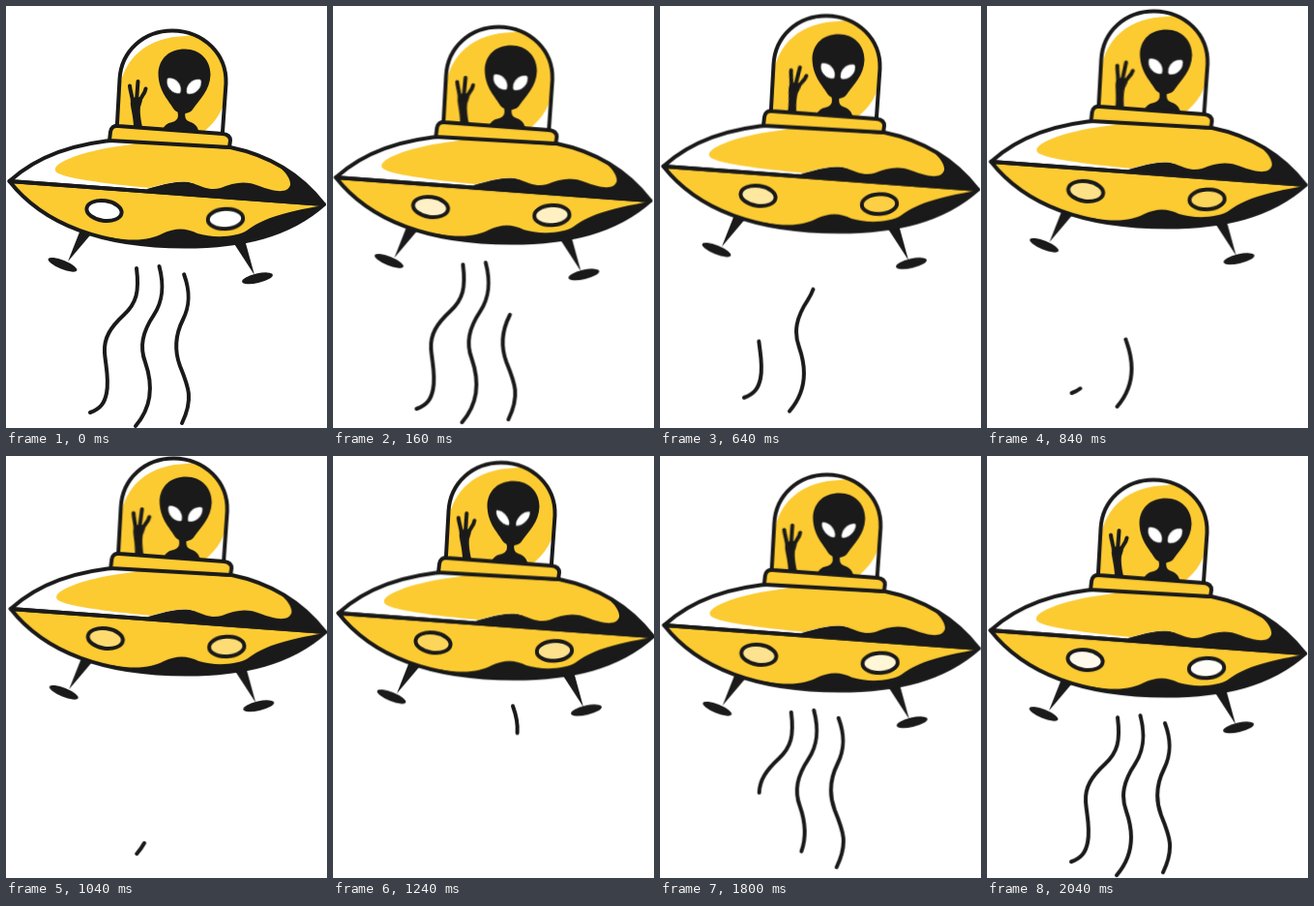
An HTML page for the animation above (2080 ms loop, 332 px wide and 436 px high).

```html
<!DOCTYPE html>
<html lang="en">
<head>
<meta charset="utf-8">
<title>Flying saucer</title>
<style>
  html, body { margin: 0; width: 100%; height: 100%; overflow: hidden; background: #fff; }
  svg { display: block; width: 332px; height: 436px; }

  .ink { fill: #1a1a1a; }
  .gold { fill: #fccb32; }
  .white { fill: #fff; }
  .line { fill: none; stroke: #1a1a1a; stroke-width: 4; stroke-linejoin: round; stroke-linecap: round; }

  .rise, .sway, .arm, .eye, .glow, .beam { animation: 2080ms linear infinite; }
  .rise { animation-name: rise; }
  .sway { animation-name: sway; }
  .arm { animation-name: wave; animation-timing-function: ease-in-out; transform-origin: 136px 126px; }
  .eye { animation-name: squint; }
  .glow.left { animation-name: glow-left; }
  .glow.right { animation-name: glow-right; }
  .beam { stroke-dasharray: 1 3; }
  .beam.a { animation-name: beam-a; }
  .beam.b { animation-name: beam-b; }
  .beam.c { animation-name: beam-c; }

  @keyframes rise {
    0%, 100% { transform: translateY(0); }
    48.1% { transform: translateY(-24px); }
  }
  @keyframes sway {
    0%, 100% { transform: translateX(0); }
    15.4% { transform: translateX(-1.2px); }
    59.6% { transform: translateX(2px); }
  }
  @keyframes wave {
    0%, 100% { transform: rotate(0deg); }
    30% { transform: rotate(10deg); }
    66% { transform: rotate(-1deg); }
  }
  @keyframes squint {
    0%, 48%, 97%, 100% { transform: scaleY(1); }
    69% { transform: scaleY(.55); }
  }
  @keyframes glow-left {
    0%, 100% { opacity: 1; }
    7.7% { opacity: .73; }
    23.1% { opacity: .62; }
    40.4% { opacity: .42; }
    59.6% { opacity: .2; }
    75% { opacity: 0; }
    98.1% { opacity: .9; }
  }
  @keyframes glow-right {
    0%, 100% { opacity: 1; }
    7.7% { opacity: .7; }
    23.1% { opacity: 0; }
    40.4% { opacity: .2; }
    59.6% { opacity: .45; }
    75% { opacity: .65; }
    98.1% { opacity: .96; }
  }
  /* Each beam is wiped away from the top, then drawn again from the top. */
  @keyframes beam-a {
    0%, 13.5% { stroke-dashoffset: 0; }
    43% { stroke-dashoffset: -1.03; }
    43.01%, 71.2% { stroke-dashoffset: 1.03; }
    98.1%, 100% { stroke-dashoffset: 0; }
  }
  @keyframes beam-b {
    0%, 24.5% { stroke-dashoffset: 0; }
    53% { stroke-dashoffset: -1.03; }
    53.01%, 63% { stroke-dashoffset: 1.03; }
    90%, 100% { stroke-dashoffset: 0; }
  }
  @keyframes beam-c {
    0% { stroke-dashoffset: 0; }
    27% { stroke-dashoffset: -1.03; }
    27.01%, 53.6% { stroke-dashoffset: 1.03; }
    83.7%, 100% { stroke-dashoffset: 0; }
  }
</style>
</head>
<body>
<svg viewBox="0 0 332 436">
  <defs>
    <path id="dome" d="M114.5 130 L117.5 76 C119 46 143 25.5 172 25.5 C205 26 228.5 50 227.5 80 L223.5 137 Z"/>
    <path id="top" d="M3.5 181 C30 157 68 141 122 138 L232 146 C276 155 308 178 329 205 Z"/>
    <path id="belly" d="M3.5 181 C38 225 98 248.5 185 248.5 C245 248.5 293 237 329 205 Z"/>
    <clipPath id="in-dome"><use href="#dome"/></clipPath>
    <clipPath id="in-top"><use href="#top"/></clipPath>
    <clipPath id="in-belly"><use href="#belly"/></clipPath>
  </defs>

  <g class="rise"><g class="sway">
    <g class="line">
      <path class="beam a" pathLength="1" d="M135 271 C138 295 135 307 122 319 C108 332 101 343 102 358 C103 372 107 385 104 400 C102 410 98 416 87 420"/>
      <path class="beam b" pathLength="1" d="M158.5 269 C164 290 162 305 153 319 C141 337 138 352 144 368 C151 388 153 412 134 434"/>
      <path class="beam c" pathLength="1" d="M184 277 C191 296 190 310 183 324 C175 340 174 356 180 372 C189 394 194 406 182 431"/>
    </g>

    <g class="ink">
      <path d="M79 226 L92 231 L64 264 Z"/>
      <ellipse cx="58.5" cy="267.3" rx="16" ry="4.6" transform="rotate(22 58.5 267.3)"/>
      <path d="M231 238 L246 238 L257 278 Z"/>
      <ellipse cx="260" cy="281.3" rx="16.3" ry="4.8" transform="rotate(-13 260 281.3)"/>
    </g>

    <g clip-path="url(#in-dome)">
      <use href="#dome" class="white"/>
      <path class="gold" d="M112 135 L117 88 C121 54 146 32 186 31 L240 20 L229 82 C227 105 218 120 202 132 Z"/>
      <g class="ink">
        <path d="M185 44.5 C201 44.5 211.5 56 211.5 71 C211 87 200 97 194 105.5 C190 113 177 113 172.5 105 C167 96 157.5 87 157.5 69 C158.5 54 169 44.5 185 44.5 Z"/>
        <path d="M177 107 H186 C184 116 186 118 191 120 C196 122 199 125 200 133 H161 C162 123 167 121 172 120 C178 118 179 115 177 107 Z"/>
        <g class="arm">
          <path d="M132 135 C133 120 130 110 129 103 C128 97 131 94 136 94 C142 94 141 99 139 104 C138 112 140 120 143 135 Z"/>
          <path class="line" d="M131 100 C131 93 128.5 89 128 82.5 M135 98 L136.5 78 M138 100 C139 93 143.5 92 144.5 85.5"/>
        </g>
      </g>
      <g class="white">
        <g transform="translate(173.5 82.5) rotate(50)"><path class="eye" d="M-10 0 C-7 -7 6 -8 10 0 C6 7 -6 7 -10 0 Z"/></g>
        <g transform="translate(194.5 83.5) rotate(-45)"><path class="eye" d="M-10 0 C-6 -8 7 -7 10 0 C6 7 -6 7 -10 0 Z"/></g>
      </g>
    </g>
    <use href="#dome" class="line"/>

    <g clip-path="url(#in-top)">
      <use href="#top" class="white"/>
      <path class="ink" d="M146 189 C164 184 180 179 193 183 L277 150 H332 V208 H146 Z"/>
      <path class="gold" d="M51 170 C48 162 79 149 130 143 C170 130 240 135 277 162 C288 169 295 179 294 185 C291 195 275 191 262 186 C248 180 236 182 222 188 C211 191 204 187 193 183 C180 179 164 184 148 188 C110 184 53 178 51 170 Z"/>
    </g>

    <g clip-path="url(#in-belly)">
      <use href="#belly" class="gold"/>
      <path class="ink" d="M108 239 C135 244 150 241 162 235 C175 229 186 229 198 235 C214 240 238 239 249 232 C264 221 284 213 329 206 V255 H108 Z"/>
    </g>
    <use href="#top" class="line"/>
    <use href="#belly" class="line"/>

    <path class="line" style="fill:#fccb32" d="M107 139 L108 130 Q109 123 116 124 L224 132 Q232 133 232 139 L231 146 Z"/>

    <g transform="translate(101.5 211.5) rotate(8)">
      <ellipse class="gold" rx="18.2" ry="10.3"/>
      <ellipse class="white glow left" rx="18.2" ry="10.3"/>
      <ellipse class="line" rx="18.2" ry="10.3"/>
    </g>
    <g transform="translate(227 220) rotate(-3)">
      <ellipse class="gold" rx="18.2" ry="10.3"/>
      <ellipse class="white glow right" rx="18.2" ry="10.3"/>
      <ellipse class="line" rx="18.2" ry="10.3"/>
    </g>
  </g></g>
</svg>
</body>
</html>
```
